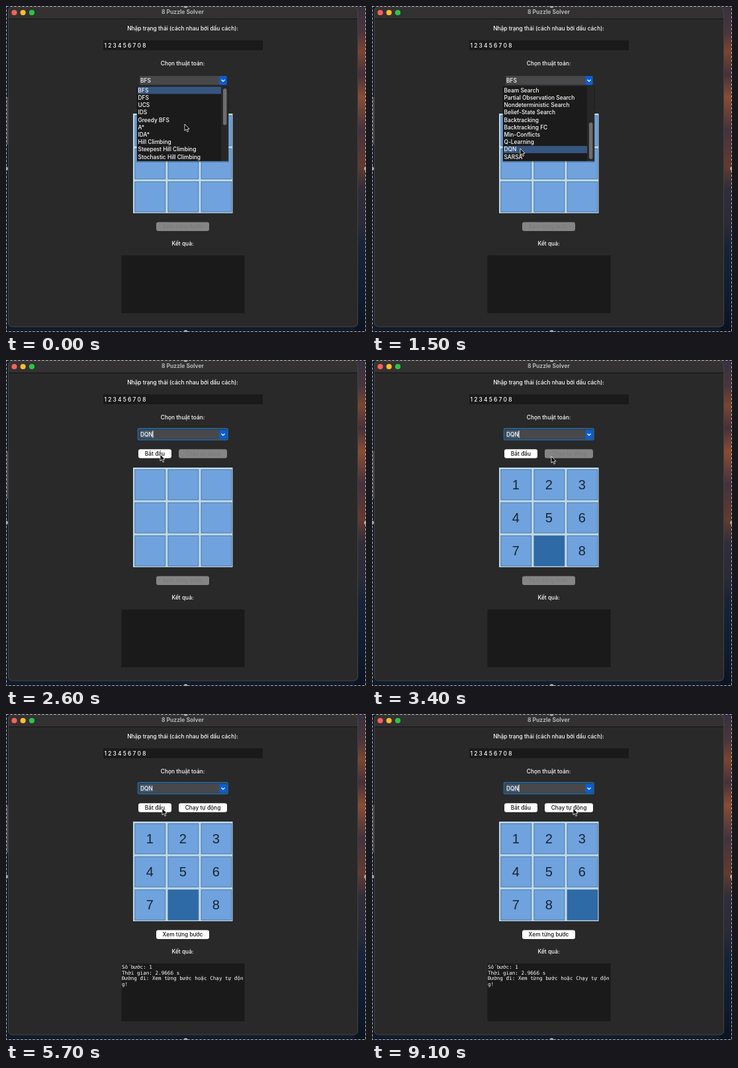
An HTML page that plays this animation: 544x494 px, repeating every 9200 ms.

```html
<!DOCTYPE html>
<html lang="vi">
<head>
<meta charset="utf-8">
<title>8 Puzzle Solver</title>
<style>
  html, body { margin: 0; width: 100%; height: 100%; overflow: hidden; background: #101a2a; }
  svg { display: block; width: 544px; height: 494px; }
  text { font: 500 8.4px Inter, "Open Sans", sans-serif; font-feature-settings: "calt" 0; fill: #fff; white-space: pre; }
  .mid { text-anchor: middle; }
  .title { font-size: 8.5px; font-weight: 700; fill: #b4b4b4; }
  .digit { font: 20px "Liberation Sans", sans-serif; fill: #172634; }
  .mono { font: 7.64px "DejaVu Sans Mono", monospace; }
  .button rect { fill: #fff; }
  .button text { fill: #111; }
  .button.off rect { fill: #858585; }
  .button.off text { fill: #7b7b7b; }
</style>
</head>
<body>
<svg viewBox="0 0 544 494">
  <defs>
    <linearGradient id="sky" x2="0" y2="1">
      <stop offset="0" stop-color="#38303f"/>
      <stop offset=".08" stop-color="#4a353c"/>
      <stop offset=".14" stop-color="#7a4531"/>
      <stop offset=".21" stop-color="#46303a"/>
      <stop offset=".28" stop-color="#8a4c33"/>
      <stop offset=".38" stop-color="#45323d"/>
      <stop offset=".49" stop-color="#633a30"/>
      <stop offset=".56" stop-color="#312d3b"/>
      <stop offset=".67" stop-color="#2b2a38"/>
      <stop offset=".74" stop-color="#172338"/>
      <stop offset=".9" stop-color="#0f1b2e"/>
      <stop offset="1" stop-color="#0b1321"/>
    </linearGradient>
    <clipPath id="listClip"><rect x="198" y="122" width="127" height="113"/></clipPath>
    <clipPath id="window"><rect x="3" y="1" width="529" height="485.500" rx="6"/></clipPath>
  </defs>

  <rect width="544" height="494" fill="#111b2b"/>
  <rect x="526" width="18" height="494" fill="url(#sky)"/>
  <rect y="138" width="3" height="72" fill="#4a4d55"/>
  <g clip-path="url(#window)">
    <rect width="544" height="494" fill="#292929"/>
    <rect width="544" height="19" fill="#333132"/>
    <rect y="19" width="544" height="1" fill="#141414"/>
  </g>
  <rect x="3.500" y="1.500" width="528" height="484.500" rx="6" fill="none" stroke="#555" stroke-opacity=".6"/>
  <circle cx="12.500" cy="10" r="4.100" fill="#ff5f57"/>
  <circle cx="25.700" cy="10" r="4.100" fill="#febc2e"/>
  <circle cx="39" cy="10" r="4.100" fill="#28c840"/>
  <text class="mid title" x="267" y="12">8 Puzzle Solver</text>

  <text class="mid" x="267" y="37">Nhập trạng thái (cách nhau bởi dấu cách):</text>
  <rect x="147" y="52" width="241" height="15" fill="#1a1a1a"/>
  <text x="148.500" y="62.700">1 2 3 4 5 6 7 0 8</text>
  <text class="mid" x="267" y="90">Chọn thuật toán:</text>

  <rect id="focusRing" x="199.500" y="103.800" width="135.500" height="17.200" rx="2" fill="#393c40" stroke="#1b6cae" stroke-width="1.600"/>
  <rect x="202" y="106" width="131.500" height="13.500" fill="#48484a"/>
  <rect id="selection" x="203" y="107" width="19" height="11" fill="#465a70"/>
  <text id="choice" x="203" y="115.700"></text>
  <rect id="caret" x="221.500" y="107" width="1" height="11" fill="#fff"/>
  <rect x="322.500" y="106" width="11" height="13.500" rx="2" fill="#0b5dd7"/>
  <path d="M325.500 111.700l2.500 2.500l2.500-2.500" fill="none" stroke="#fff" stroke-width="1.300"/>

  <g id="buttons"></g>
  <rect x="192" y="163" width="150.500" height="151" fill="#bcdaf0"/>
  <g id="board"></g>

  <text class="mid" x="267" y="363">Kết quả:</text>
  <rect x="174.500" y="378" width="186" height="87.500" fill="#1a1a1a"/>
  <g id="result"></g>

  <g id="popup">
    <rect x="197" y="122" width="140" height="115" fill="#000" opacity=".25"/>
    <rect x="198" y="121.500" width="138" height="113.500" fill="#1b1b1b"/>
    <rect x="325" y="121.500" width="11" height="113.500" fill="#272727"/>
    <rect id="thumb" x="328" y="125" width="5.500" height="55.500" rx="2.700" fill="#6d6d6d"/>
    <g clip-path="url(#listClip)"><g id="list"><rect id="hover" x="199" width="126" height="11" fill="#36557f"/></g></g>
  </g>

  <rect x=".5" y=".5" width="543" height="493" fill="none" stroke="#33363c"/>
  <rect x=".5" y=".5" width="543" height="493" fill="none" stroke="#c8c8c8" stroke-dasharray="3 3"/>
  <g id="handles" fill="#a9a9a9"></g>
  <path id="cursor" d="M0 0V10L2.300 7.900L4 11.700L5.700 10.900L4 7.300H7Z" fill="#000" stroke="#fff" stroke-width=".8"/>
</svg>
<script>
const LOOP = 9200, STEP = 100;
const CLOSE = 1600, START = 2700, SOLVED = 5700, MOVED = 7000;
const ROW = 11.22;
const algorithms = ["BFS", "DFS", "UCS", "IDS", "Greedy BFS", "A*", "IDA*", "Hill Climbing",
  "Steepest Hill Climbing", "Stochastic Hill Climbing", "Beam Search", "Partial Observation Search",
  "Nondeterministic Search", "Belief-State Search", "Backtracking", "Backtracking FC",
  "Min-Conflicts", "Q-Learning", "DQN", "SARSA"];
const output = ["Số bước: 1", "Thời gian: 2.9666 s", "Đường đi: Xem từng bước hoặc Chạy tự độn", "g!"];
// time, x, y
const pointer = [[0, 270, 179], [700, 270, 179], [1200, 224, 228], [1400, 224, 228], [1500, 224, 216],
  [1700, 222, 180], [2400, 231, 143], [2900, 236, 143], [3400, 271, 146], [3900, 238, 144],
  [4200, 236, 143], [5900, 236, 143], [6700, 304, 143], [LOOP, 304, 143]];

const $ = id => document.getElementById(id);

function add(parent, tag, attrs, text = "") {
  const node = document.createElementNS("http://www.w3.org/2000/svg", tag);
  for (const name in attrs) node.setAttribute(name, attrs[name]);
  node.textContent = text;
  return parent.appendChild(node);
}

function addButton(x, y, width, label) {
  const group = add($("buttons"), "g", { class: "button" });
  add(group, "rect", { x, y, width, height: 13.5, rx: 3 });
  add(group, "text", { class: "mid", x: x + width / 2, y: y + 9.7 }, label);
  return group;
}

addButton(200, 135.3, 50, "Bắt đầu");
const solvedButtons = [addButton(261, 135.3, 73, "Chạy tự động"), addButton(227, 327.5, 80, "Xem từng bước")];

const tiles = Array.from({ length: 9 }, (_, i) => {
  const x = 194.8 + i % 3 * 50.1, y = 166 + Math.floor(i / 3) * 50.1;
  const face = add($("board"), "rect", { x, y, width: 46, height: 46, stroke: "#41688f", "stroke-width": 0.8 });
  const digit = add($("board"), "text", { class: "mid digit", x: x + 22.4, y: y + 30 });
  return { face, digit };
});

algorithms.forEach((name, i) => add($("list"), "text", { x: 199.5, y: 130.7 + i * ROW }, name));
output.forEach((line, i) => add($("result"), "text", { class: "mono", x: 175, y: 386 + i * 8.5 }, line));
[[0, 246.5], [544, 246.5], [271.5, 0], [271.5, 494]].forEach(([cx, cy]) => add($("handles"), "circle", { cx, cy, r: 3 }));

function show(id, visible) {
  $(id).style.display = visible ? "" : "none";
}

function pointerAt(t) {
  const next = pointer.findIndex(key => key[0] > t);
  const [t0, x0, y0] = pointer[next - 1], [t1, x1, y1] = pointer[next];
  const k = (t - t0) / (t1 - t0);
  return [x0 + (x1 - x0) * k, y0 + (y1 - y0) * k];
}

// The caret is on for 600 ms and off for 300 ms, and freezes while the solver runs.
function caretOn(t) {
  if (t < CLOSE) return false;
  if (t < START) return (t - CLOSE) % 900 < 600;
  return t < SOLVED || (t - SOLVED) % 900 >= 300;
}

function draw(t) {
  const open = t < CLOSE;
  const scroll = t < 100 ? 0 : t < 200 ? 3 : t < 300 ? 8 : 10;
  show("popup", open);
  $("list").setAttribute("transform", `translate(0 ${-scroll * ROW})`);
  $("hover").setAttribute("y", 122.3 + (t < 1500 ? 0 : 18) * ROW);
  $("thumb").setAttribute("y", 125 + scroll * 5.15);

  show("focusRing", !open);
  show("selection", !open);
  show("caret", caretOn(t));
  $("choice").textContent = open ? "BFS" : "DQN";

  const order = t < START ? "" : t < MOVED ? "123456708" : "123456780";
  tiles.forEach(({ face, digit }, i) => {
    const value = order[i] || "";
    face.setAttribute("fill", value === "0" ? "#2d6aa6" : "#70a2dd");
    digit.textContent = value === "0" ? "" : value;
  });

  solvedButtons.forEach(button => button.classList.toggle("off", t < SOLVED));
  show("result", t >= SOLVED);
  $("cursor").setAttribute("transform", `translate(${pointerAt(t)})`);
}

function tick() {
  draw(Math.floor(performance.now() % LOOP / STEP) * STEP);
  requestAnimationFrame(tick);
}
tick();
</script>
</body>
</html>
```
